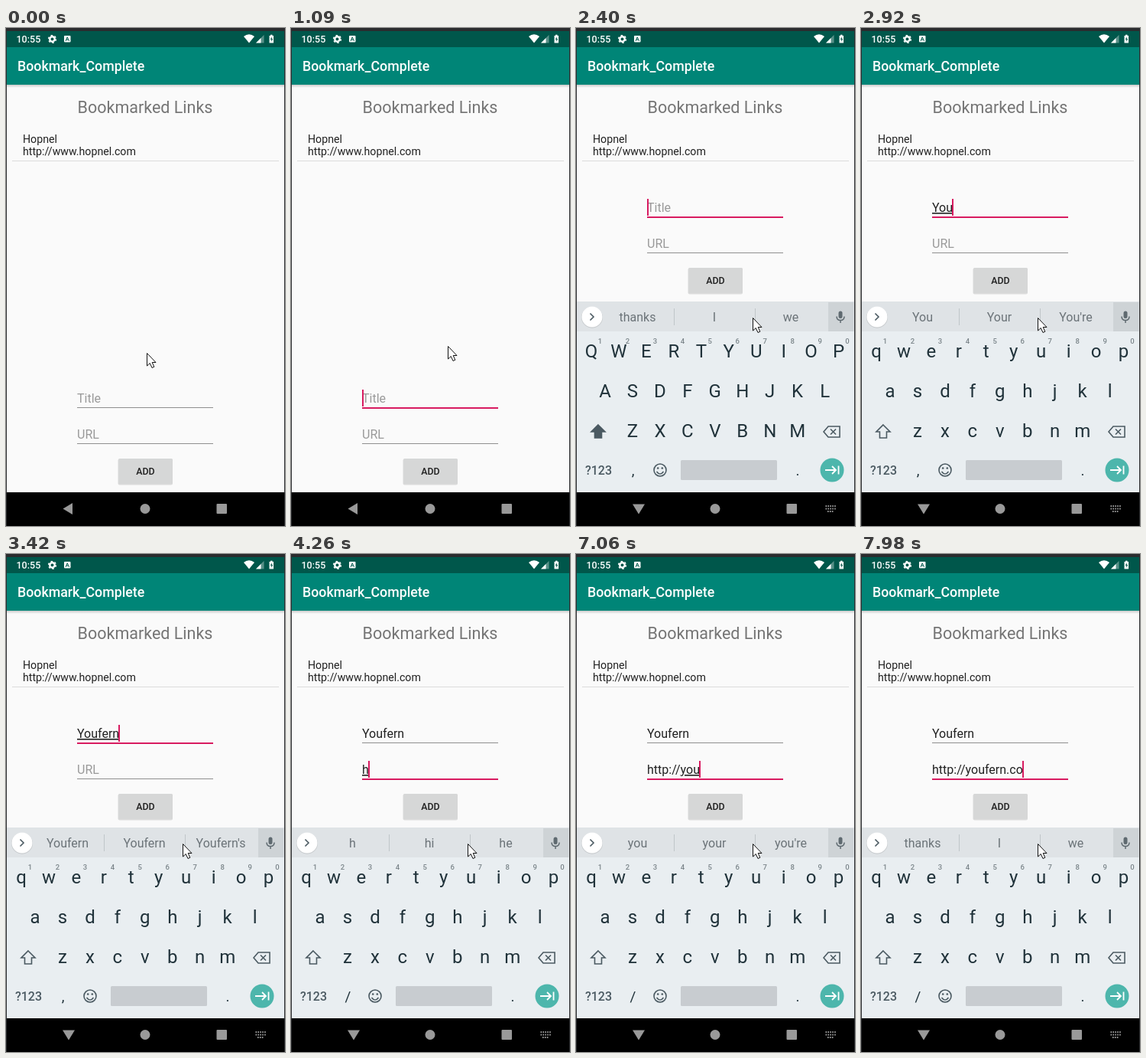
Animation, 365 px wide and 650 px high, one loop 8 s. Source, as an HTML page:

```html
<!DOCTYPE html>
<html lang="en">
<head>
<meta charset="utf-8">
<title>Bookmark form</title>
<style>
  html, body { margin: 0; width: 100%; height: 100%; overflow: hidden; background: #000; }
  svg { display: block; width: 365px; height: 650px; font-family: Roboto, sans-serif; }
  text { white-space: pre; }
  .mid { text-anchor: middle; }
  .key { font-size: 24px; fill: #20323a; }
  .num { font-size: 9.5px; font-weight: 500; fill: #7b858a; }
  .hint { font-size: 16px; fill: #6b7378; }
  .field { font-size: 16px; }
  .line { fill: none; stroke: #4b5a62; stroke-width: 1.6; }
  .composing { text-decoration: underline; }
</style>
</head>
<body>
<svg viewBox="0 0 365 650">
  <defs>
    <linearGradient id="shade" x2="0" y2="1">
      <stop stop-color="#000" stop-opacity=".2"/><stop offset="1" stop-color="#000" stop-opacity="0"/>
    </linearGradient>
    <clipPath id="screen"><rect x="1" y="4" width="363" height="642"/></clipPath>
  </defs>

  <rect width="365" height="650" fill="#2b2c2e"/>
  <rect x="1" y="4" width="363" height="602" fill="#fafafa"/>

  <!-- status bar -->
  <rect x="1" y="4" width="363" height="21" fill="#00574b"/>
  <g fill="#fff">
    <text x="13.500" y="19" font-size="12.500" font-weight="500">10:55</text>
    <circle cx="60.500" cy="14.500" r="3.200" fill="none" stroke="#fff" stroke-width="2.400"/>
    <circle cx="60.500" cy="14.500" r="4.900" fill="none" stroke="#fff" stroke-width="1.400" stroke-dasharray="2.500 2.631"/>
    <rect x="76" y="10" width="8.500" height="8.500" rx="1"/>
    <path d="M78 17L80.250 11.800L82.500 17M79 15.200h2.500" fill="none" stroke="#00574b"/>
    <path d="M311 11Q318 5.500 325 11L318 19.500Z"/>
    <path d="M327 19.500L337.500 9V19.500Z" opacity=".35"/>
    <path d="M327 19.500L333.500 13V19.500Z"/>
    <path d="M344.500 10h1.500v-1.200h2.500V10h1.500v9.500h-5.500Z"/>
    <path d="M347.800 11.500L345.800 15h1.400v2.800l2-3.600h-1.400Z" fill="#00574b"/>
  </g>

  <!-- app bar and list -->
  <rect x="1" y="25" width="363" height="49" fill="#008577"/>
  <rect x="1" y="74" width="363" height="4" fill="url(#shade)"/>
  <text x="15" y="56" font-size="17.800" font-weight="500" fill="#fff">Bookmark_Complete</text>
  <text class="mid" x="182" y="111" font-size="21.500" fill="#757575">Bookmarked Links</text>
  <g font-size="14.200" fill="#212121">
    <text x="22" y="150">Hopnel</text>
    <text x="22" y="166">http://www.hopnel.com</text>
  </g>
  <rect x="8" y="173" width="349" height="1" fill="#dcdcdc"/>

  <!-- form -->
  <g id="form">
    <g id="fields"></g>
    <rect x="146.500" y="313.500" width="71.500" height="34" rx="2" fill="#000" opacity=".12"/>
    <rect x="147" y="313" width="71" height="33" rx="1.500" fill="#d6d7d7"/>
    <text class="mid" x="182.500" y="334" font-size="12.400" font-weight="500" fill="#212121">ADD</text>
  </g>

  <rect x="1" y="606" width="363" height="44" fill="#000"/>

  <!-- keyboard -->
  <g clip-path="url(#screen)">
    <g id="board">
      <rect x="1" y="357" width="363" height="249" fill="#e9eef1"/>
      <rect x="1" y="357" width="363" height="39" fill="#dfe3e6"/>
      <rect x="330" y="358" width="33" height="38" fill="#ced3d6"/>
      <circle cx="21" cy="377.700" r="14" fill="#000" opacity=".1"/>
      <circle cx="21" cy="377" r="13.500" fill="#fff"/>
      <path class="line" d="M18.500 372.500L23 377L18.500 381.500"/>
      <g id="hints"></g>
      <path id="bars" d="M128.500 366V388M234.500 366V388" stroke="#c0c6c9"/>
      <rect x="343.500" y="369.500" width="5" height="9.500" rx="2.500" fill="#5f6a70"/>
      <path d="M341 376.500Q341 381.500 346 381.500T351 376.500M346 381.500V385" fill="none" stroke="#5f6a70" stroke-width="1.500"/>
      <g id="keys"></g>
      <path id="shift" class="line" d="M29 518L38 527H33.500V535H24.500V527H20Z"/>
      <path class="line" d="M330 520H345V534H330L324 527ZM333 523.500L340 530.500M340 523.500L333 530.500"/>
      <text class="mid" x="29.500" y="582.500" font-size="16" font-weight="500" fill="#4b5a62">?123</text>
      <text id="mark" class="mid" x="74.500" y="583.500" font-size="19" fill="#20323a"></text>
      <circle class="line" cx="110" cy="577" r="8"/>
      <path class="line" d="M105.500 579Q110 585 114.500 579"/>
      <circle cx="107.200" cy="574.500" r="1.300" fill="#4b5a62"/>
      <circle cx="112.800" cy="574.500" r="1.300" fill="#4b5a62"/>
      <rect x="137" y="564" width="126" height="26" rx="1.500" fill="#c8ccd0"/>
      <text class="mid" x="290" y="583.500" font-size="19" fill="#20323a">.</text>
      <circle cx="335" cy="577" r="15.500" fill="#4db6ac"/>
      <path d="M326 577H340M335 572L340 577L335 582M343.500 571.500V582.500" fill="none" stroke="#fff" stroke-width="1.800"/>
    </g>
  </g>

  <!-- navigation -->
  <g id="nav">
    <path id="back"/>
    <circle cx="182" cy="627.500" r="6.500"/>
    <rect x="275.500" y="621" width="13.500" height="13" rx="1"/>
    <path id="switch" d="M326.500 624H340M326.500 627.500H340M329 631H337.500" fill="none" stroke-width="1.800" stroke-dasharray="1.600 1.300"/>
  </g>

  <path id="pointer" d="M0 0V16.500L3.800 13L6.500 19L9.300 17.800L6.700 12H11.500Z" fill="#fff" stroke="#111" stroke-width="1"/>
</svg>

<script>
const $ = id => document.getElementById(id);
const LOOP = 8000;

function add(parent, tag, attrs, text = '') {
  const el = document.createElementNS('http://www.w3.org/2000/svg', tag);
  for (const name in attrs) el.setAttribute(name, attrs[name]);
  el.textContent = text;
  return parent.appendChild(el);
}

function set(el, attrs) {
  for (const name in attrs) el.setAttribute(name, attrs[name]);
}

const hints = [80.5, 181, 281].map(x => add($('hints'), 'text', { class: 'hint mid', x, y: 383 }));

const keys = [];
[['qwertyuiop', 20, 430], ['asdfghjkl', 38, 482], ['zxcvbnm', 74, 534]].forEach(([row, x0, y], r) => {
  [...row].forEach((letter, i) => {
    const x = x0 + 35.95 * i;
    keys.push(add($('keys'), 'text', { class: 'key mid', x, y }, letter));
    if (!r) add($('keys'), 'text', { class: 'num mid', x: x + 11.5, y: 412 }, (i + 1) % 10);
  });
});

function makeField(name, y) {
  const text = add($('fields'), 'text', { class: 'field', x: 93, y });
  return {
    name, y,
    text,
    plain: add(text, 'tspan', {}),
    composing: add(text, 'tspan', { class: 'composing' }),
    rule: add($('fields'), 'rect', { x: 93, y: y + 6, width: 178, height: 1, fill: '#8f8f8f' }),
    glow: add($('fields'), 'rect', { y: y + 6, height: 2, fill: '#d81b60' }),
    caret: add($('fields'), 'rect', { y: y - 17, width: 2, height: 22, fill: '#d81b60' })
  };
}
const fields = [makeField('Title', 240), makeField('URL', 287)];

// Typed text: "|" separates finished text from the part being composed.
const type = (field, value, words) => ({ [field]: value, caret: 1, ...(words && { words }) });
const title = (value, words) => type('Title', value, words);
const url = (value, words) => type('URL', value, words);
const idle = 'thanks,I,we';

const steps = [
  [0, { at: [184, 424], focus: '', spread: 1, caret: 0, lift: 0, drop: 249, alpha: 0,
        Title: '', URL: '', words: idle, caps: 0 }],
  [150, { at: [174, 457] }],
  [300, { at: [146, 471] }],
  [420, { at: [134, 475.5] }],
  [670, { at: [138, 480] }],
  [820, { focus: 'Title', spread: .5, caret: 1 }],
  [940, { spread: 1, at: [141, 481] }],
  [1090, { at: [205, 415] }],
  [1210, { at: [231, 378] }],
  [1610, { lift: 1, caret: 0, drop: 75, alpha: .12 }],
  [1730, { drop: 39, alpha: .5 }],
  [1850, { drop: 8, alpha: .9, caret: 1 }],
  [1970, { drop: 0, alpha: 1 }],
  [2400, { caps: 1 }],
  [2520, title('|Y', 'Y,You,Yes')],
  [2650, { caps: 0 }],
  [2770, title('|Yo', 'Yo,You,Your')],
  [2920, title('|You', "You,Your,You're")],
  [3040, title('|Youf', "Youf,Youfern,Youfern's")],
  [3160, title('|Youfe', "Youfe,Youfern,Youfern's")],
  [3300, title('|Youfer', "Youfer,Youfern,Youfern's")],
  [3420, title('|Youfern', "Youfern,Youfern,Youfern's")],
  [3700, { Title: 'Youfern', focus: 'URL', spread: .5, words: idle }],
  [3820, { spread: 1 }],
  [4100, { caret: 0 }],
  [4260, url('|h', 'h,hi,he')],
  [4530, url('|ht', 'ht,hit,hot')],
  [4680, url('|htt', 'htt,hit,hot')],
  [4830, url('|http', 'http,http://,https')],
  [5240, url('http:', 'to,I,you')],
  [5740, url('http:/')],
  [5890, url('http://')],
  [6420, { caret: 0 }],
  [6820, url('http://|y', 'y,you,your')],
  [6940, url('http://|yo', 'yo,you,your')],
  [7060, url('http://|you', "you,your,you're")],
  [7210, url('http://|youf', 'youf,four,your')],
  [7350, url('http://|youfe', "youfe,youfern,youfern's")],
  [7470, url('http://|youfer', "youfer,youfern,youfern's")],
  [7590, url('http://|youfern', "youfern,youfern,youfern's")],
  [7710, url('http://youfern.', idle)],
  [7860, url('http://youfern.c', '')],
  [7980, url('http://youfern.co')]
];

function drawField(f, s) {
  const [plain, composing = ''] = s[f.name].split('|');
  const filled = plain + composing;
  const active = s.focus === f.name;
  f.plain.textContent = filled ? plain : f.name;
  f.composing.textContent = composing;
  f.text.setAttribute('fill', filled ? '#212121' : '#9a9a9a');
  set(f.glow, { x: 93 + 89 * (1 - s.spread), width: 178 * s.spread, visibility: active ? 'visible' : 'hidden' });
  set(f.caret, {
    x: 93 + (filled ? Math.floor(f.text.getComputedTextLength() - .5) : 0),
    visibility: active && s.caret ? 'visible' : 'hidden'
  });
}

function draw(s) {
  $('form').setAttribute('transform', `translate(0 ${s.lift ? 0 : 249})`);
  fields.forEach(f => drawField(f, s));
  set($('board'), { transform: `translate(0 ${s.drop})`, opacity: s.alpha });
  const words = s.words.split(',');
  hints.forEach((el, i) => el.textContent = words[i] || '');
  $('bars').setAttribute('visibility', s.words ? 'visible' : 'hidden');
  keys.forEach(k => k.textContent = s.caps ? k.textContent.toUpperCase() : k.textContent.toLowerCase());
  $('shift').style.fill = s.caps ? '#4b5a62' : 'none';
  $('mark').textContent = s.focus === 'URL' ? '/' : ',';
  const tone = s.alpha > 0 && s.alpha < 1 ? '#e6e6e6' : '#999';
  $('nav').setAttribute('fill', tone);
  set($('switch'), { stroke: tone, visibility: s.lift ? 'visible' : 'hidden' });
  $('back').setAttribute('d', s.lift ? 'M74 621.500H90L82 634.500Z' : 'M74.500 627.500L87 620V635Z');
  $('pointer').setAttribute('transform', `translate(${s.at[0] + .5} ${s.at[1] + .5})`);
}

let shown = -1;
function tick() {
  const t = performance.now() % LOOP;
  const count = steps.filter(([start]) => start <= t).length;
  if (count !== shown) {
    shown = count;
    draw(Object.assign({}, ...steps.slice(0, count).map(([, change]) => change)));
  }
  requestAnimationFrame(tick);
}
tick();
</script>
</body>
</html>
```
